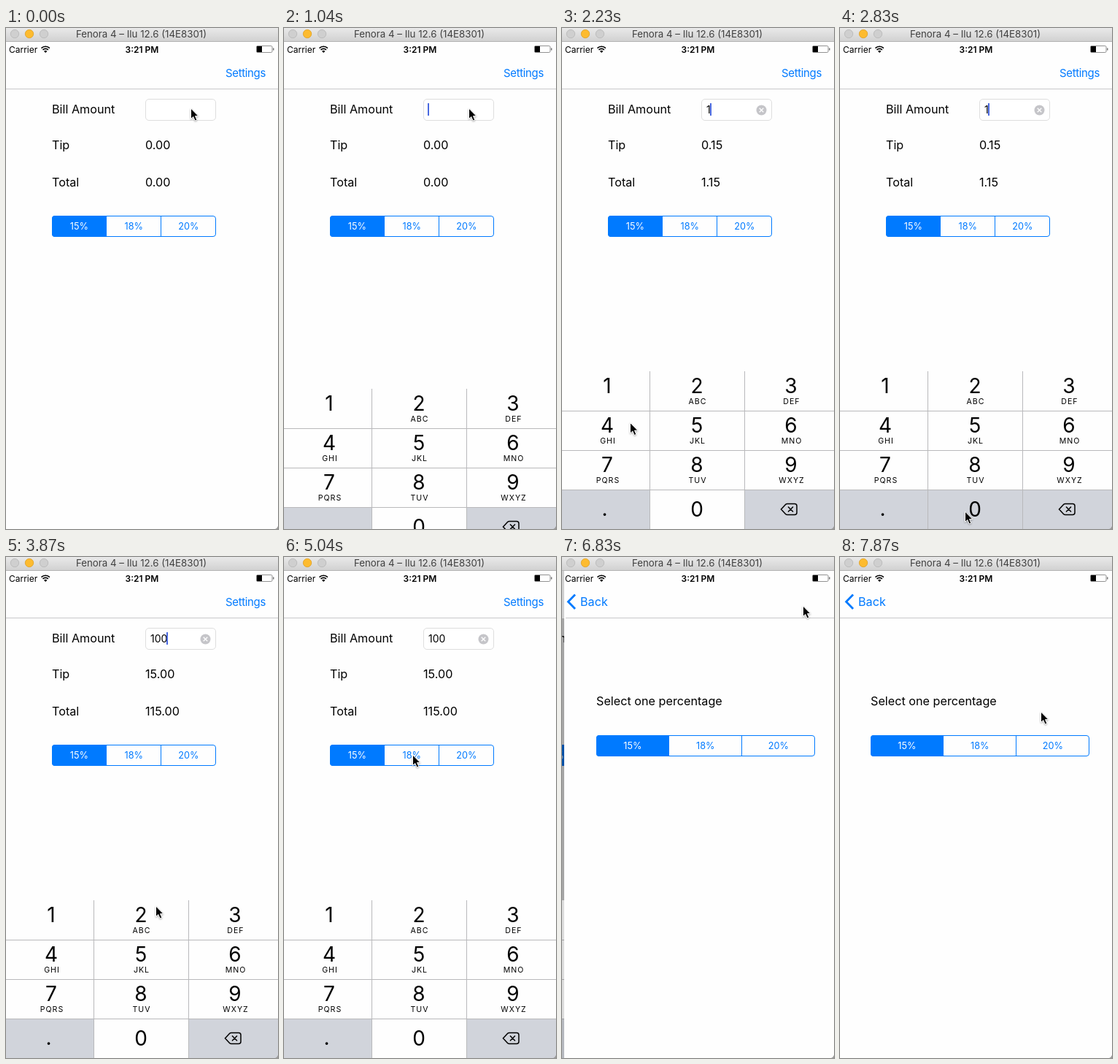
An HTML page that plays this animation: 373 by 686 pixels, repeating every 8 s.

```html
<!DOCTYPE html>
<html lang="en">
<head>
<meta charset="utf-8">
<title>Tip calculator</title>
<style>
  html, body { margin: 0; height: 100%; overflow: hidden; background: #fefefe; }
  svg { display: block; font: 16.2px Inter, sans-serif; cursor: default; }
  .blue { fill: #007aff; }
  .line { fill: none; stroke: #007aff; }
  .mid { text-anchor: middle; }
  .seg { font-size: 12.7px; text-anchor: middle; }
  .digit { font-size: 28px; text-anchor: middle; }
  .letters { font-size: 10.6px; letter-spacing: 1px; text-anchor: middle; }
  .small { font-size: 12px; }
</style>
</head>
<body>
<svg id="stage" width="373" height="686" viewBox="0 0 373 686"></svg>
<script>
const STEP = 148.5, LOOP = 8000;
const stage = document.getElementById('stage');

const text = (x, y, s, attrs = '') => `<text x="${x}" y="${y}" ${attrs}>${s}</text>`;
const rect = (x, y, w, h, attrs = '') =>
  `<rect x="${x}" y="${y}" width="${w}" height="${h}" ${attrs}/>`;

function segments(x, y, w) {
  const cell = w / 3;
  return rect(x + .5, y + .5, w - 1, 28, 'rx="3.5" class="line"') +
    `<path class="blue" d="M${x + cell} ${y}H${x + 4}q-4 0-4 4v21q0 4 4 4H${x + cell}z"/>` +
    `<path class="line" d="M${x + 2 * cell - .5} ${y}v29"/>` +
    ['15%', '18%', '20%'].map((s, i) =>
      text(x + cell * (i + .5) - .2, y + 19, s, `class="seg" fill="${i ? '#007aff' : '#fff'}"`)).join('');
}

function keypad() {
  const letters = ['', 'ABC', 'DEF', 'GHI', 'JKL', 'MNO', 'PQRS', 'TUV', 'WXYZ'];
  const keys = letters.map((s, i) => {
    const x = [62, 185, 314][i % 3], y = 500 + 54 * Math.floor(i / 3);
    return text(x, y, i + 1, 'class="digit"') + text(x + 1, y + 15, s, 'class="letters"');
  }).join('');
  return rect(0, 470, 373, 216, 'fill="#fefefe"') +
    rect(0, 632, 120, 54, 'fill="#d1d4db"') + rect(251, 632, 122, 54, 'fill="#d1d4db"') +
    rect(0, 470, 120, 54, 'id="key1" fill="#d1d4db"') +
    rect(121, 632, 130, 54, 'id="key0" fill="#d1d4db"') +
    '<path d="M120.5 470V686M250.5 470V686M0 524.5H373M0 578.5H373M0 632.5H373" stroke="#b9b9bb"/>' +
    keys + text(185, 669, 0, 'class="digit"') + text(58.5, 668, '.', 'class="digit"') +
    `<path d="M300.5 659l6-6.5q1-1 2.5-1h10q3 0 3 3v9q0 3-3 3h-10q-1.5 0-2.5-1z
      M310 655.5l7 7M317 655.5l-7 7" fill="none" stroke="#000" stroke-width="1.5"/>`;
}

const navLine = '<path d="M0 83.5H380" stroke="#c8c8ca"/>';

stage.innerHTML = `
<defs><linearGradient id="bar" x2="0" y2="1">
  <stop stop-color="#e9e9e9"/><stop offset="1" stop-color="#d0d0d0"/>
</linearGradient></defs>
${rect(0, 0, 373, 686, 'fill="#fefefe"')}
<g id="home">
  ${navLine}
  ${text(356, 67, 'Settings', 'id="link" class="blue" text-anchor="end" font-size="15" letter-spacing="-.35"')}
  ${text(63, 117, 'Bill Amount')}${text(63, 166, 'Tip')}${text(63, 217, 'Total')}
  ${rect(191.5, 97.5, 96, 29, 'rx="4.5" fill="#fff" stroke="#dedede"')}
  ${text(198, 117, '', 'id="bill" font-size="14"')}
  ${rect(0, 103, 2, 17, 'id="caret" fill="#4a69e0"')}
  <g id="clear"><circle cx="273.5" cy="112.5" r="7" fill="#c5c5c9"/>
    <path d="M270.7 109.7l5.6 5.6M276.3 109.7l-5.6 5.6" stroke="#fff" stroke-width="1.3"/></g>
  ${text(191, 166, '', 'id="tip"')}${text(191, 217, '', 'id="total"')}
  ${segments(63, 257, 225)}
</g>
${rect(0, 84, 8, 602, 'id="dim" opacity=".35"')}
<g id="pad">${keypad()}</g>
<g id="settings">
  ${rect(-5, 19, 8, 65, 'fill="#d0d0d0"')}
  ${rect(-5, 470, 8, 216, 'opacity=".13"')}
  ${rect(-2, 19, 380, 667, 'fill="#fefefe"')}${navLine}
  ${text(42, 203, 'Select one percentage')}
  ${segments(42, 244, 300)}
</g>
<g id="back">
  <path d="M18 51.5L8.5 61.2L18 71" class="line" stroke-width="2.8"/>
  ${text(25, 67, 'Back', 'class="blue"')}
</g>
<path d="M373 682v4h-4q3-1 4-4z" fill="#999"/>
${rect(0, 0, 373, 19, 'fill="url(#bar)"')}
<path d="M0 18.5H373" stroke="#b4b4b4"/>
${['#cfcfcf', '#fdbb2f', '#cfcfcf'].map((c, i) =>
  `<circle cx="${12 + 20 * i}" cy="8" r="5.7" fill="${c}" stroke="${i === 1 ? '#dfa023' : '#b6b6b6'}" stroke-width=".8"/>`).join('')}
${text(185.5, 13, 'Fenora 4 – Ilu 12.6 (14E8301)', 'class="mid" font-size="13.3" fill="#404040"')}
${text(4, 34, 'Carrier', 'class="small"')}
<path d="M48.5 27.6a8 8 0 0 1 11.4 0M50.5 30a5 5 0 0 1 7.4 0" fill="none" stroke="#000" stroke-width="1.6"/>
<path d="M52 31.8a3.2 3.2 0 0 1 4.4 0L54.2 34z"/>
${text(186.5, 34, '3:21 PM', 'class="mid small" font-weight="600"')}
${rect(343.5, 24.5, 21.5, 9, 'rx="1.5" fill="none" stroke="#777" stroke-width=".8"')}
${rect(344, 25, 7, 8)}${rect(366, 27.5, 1.5, 3, 'fill="#777"')}
<path id="pointer" d="M-.5 0V14.5L2.8 11.5L5.2 17L7.8 15.9L5.5 10.6H9.9Z"
  stroke="#fff" style="filter:drop-shadow(0 1px 1px #0005)"/>`;

const el = Object.fromEntries([...stage.querySelectorAll('[id]')].map(e => [e.id, e]));
const show = (e, on) => e.setAttribute('visibility', on ? 'visible' : 'hidden');
const move = (e, x, y) => e.setAttribute('transform', `translate(${x} ${y})`);

// Pointer path: [step, x, y]
const path = [
  [0, 254, 110], [7, 254, 110], [11, 109, 497], [12, 68, 500], [14, 68, 500],
  [18, 172, 662], [25, 172, 662], [26, 206, 478], [29, 226, 380], [33, 177, 273],
  [34, 177, 271], [38, 331, 67], [51, 331, 67], [53, 276, 212]
];
const caretOn = [[5, 9], [12, 28], [35, 37], [40, 46]];

function pointerAt(n) {
  const i = Math.max(1, path.findIndex(p => p[0] >= n));
  const [a, ax, ay] = path[i - 1], [b, bx, by] = path[i];
  const k = (n - a) / (b - a);
  return [ax + (bx - ax) * k, ay + (by - ay) * k];
}

function draw(time) {
  const n = Math.floor((time % LOOP + 10) / STEP);
  const bill = n < 14 ? '' : n < 20 ? '1' : n < 23 ? '10' : '100';
  const pushing = n === 46, onSettings = n >= 46;

  el.bill.textContent = bill;
  el.tip.textContent = (bill * .15).toFixed(2);
  el.total.textContent = (bill * 1.15).toFixed(2);
  el.caret.setAttribute('x', Math.floor(198 + el.bill.getComputedTextLength() - .5));
  show(el.caret, caretOn.some(([a, b]) => n >= a && n <= b));
  show(el.clear, bill);
  show(el.key1, n === 13);
  show(el.key0, n === 19 || n === 21 || n === 22);
  el.link.setAttribute('opacity', n >= 40 ? .25 : 1);

  const rise = Math.max(0, Math.min(1, 1 - (n - 5) / 3));
  move(el.pad, pushing ? -368 : 0, 216 * rise ** 2);
  move(el.home, pushing ? -110 : 0, 0);
  move(el.settings, pushing ? 5 : 0, 0);
  show(el.dim, pushing);
  show(el.settings, onSettings);
  show(el.back, onSettings);
  move(el.pointer, ...pointerAt(n));
}

function tick(now) {
  draw(now);
  requestAnimationFrame(tick);
}
requestAnimationFrame(tick);
</script>
</body>
</html>
```
